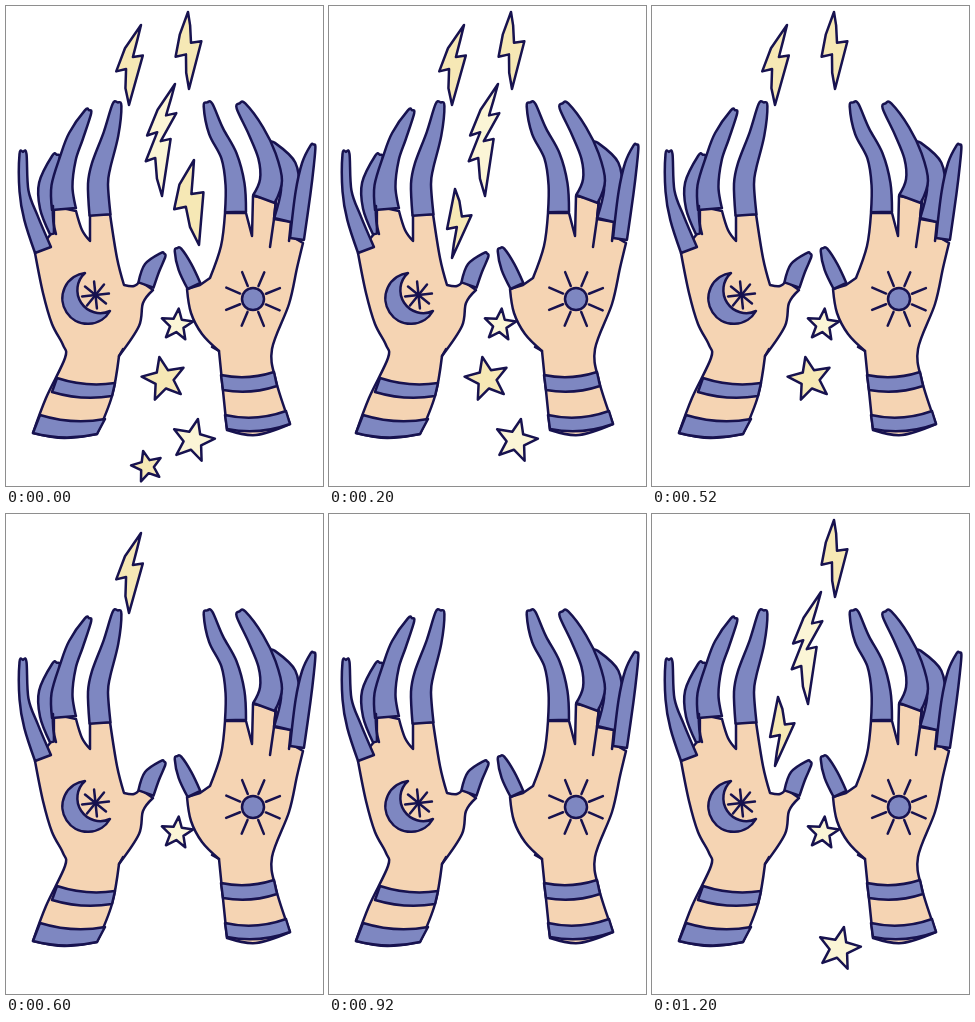
An HTML page that plays this animation: 317x480 px, repeating every 1400 ms.

```html
<!DOCTYPE html>
<html lang="en">
<head>
<meta charset="utf-8">
<title>Magic hands</title>
<style>
  html, body { margin: 0; width: 100%; height: 100%; overflow: hidden; background: #fff; }
  svg { display: block; width: 100%; height: 100%; }
  path, circle { stroke: #17124f; stroke-width: 2.5; stroke-linejoin: round; stroke-linecap: round; }
</style>
</head>
<body>
<svg id="art" viewBox="0 0 317 480"></svg>
<script>
const art = document.getElementById('art');
const SKIN = '#f5d4b3', VIOLET = '#7e87c1', BUTTER = '#f6e8b5', PALE = '#fbf5d6';
const STEP = 200, STEPS = 7;

function path(d, fill = 'none') {
  const el = document.createElementNS('http://www.w3.org/2000/svg', 'path');
  el.setAttribute('d', d);
  el.setAttribute('fill', fill);
  return art.appendChild(el);
}

const polar = (x, y, r, deg) => {
  const a = deg * Math.PI / 180;
  return [x + r * Math.cos(a), y + r * Math.sin(a)];
};

// Closed smooth curve; a third element marks a sharp corner.
function smooth(points) {
  const n = points.length, at = i => points[(i + n) % n];
  const handle = (p, prev, next, dir) =>
    p[2] ? [p[0], p[1]] : [0, 1].map(k => p[k] + dir * (next[k] - prev[k]) / 6);
  let d = `M${points[0][0]},${points[0][1]}`;
  for (let i = 0; i < n; i++) {
    const b = at(i), c = at(i + 1);
    d += `C${handle(b, at(i - 1), c, 1)} ${handle(c, b, at(i + 2), -1)} ${c[0]},${c[1]}`;
  }
  return d + 'Z';
}

// Points are "x,y"; a trailing "!" marks a corner.
const parse = text => text.trim().split(/\s+/).map(w =>
  [...w.replace('!', '').split(',').map(Number), w.endsWith('!')]);

// Joints run from tip to base as [x, y, half width].
function finger(...joints) {
  const left = [], right = [], last = joints.length - 1;
  let cap;
  joints.forEach(([x, y, w], i) => {
    const a = joints[Math.max(0, i - 1)], b = joints[Math.min(last, i + 1)];
    const len = Math.hypot(b[0] - a[0], b[1] - a[1]);
    const dx = w * (b[0] - a[0]) / len, dy = w * (b[1] - a[1]) / len;
    if (i === 0) cap = [x - dx * 0.6, y - dy * 0.6];
    left.push([x + dy, y - dx, i === last]);
    right.unshift([x - dy, y + dx, i === last]);
  });
  path(smooth([cap, ...left, ...right]), VIOLET);
}

// A band across the arm: two sagging edges, top and bottom.
function strap(x0, y0, x1, y1, x2, y2, x3, y3, sag) {
  const dip = (xa, ya, xb, yb) => `Q${(xa + xb) / 2},${(ya + yb) / 2 + sag} ${xb},${yb}`;
  path(`M${x0},${y0}${dip(x0, y0, x1, y1)}L${x2},${y2}${dip(x2, y2, x3, y3)}Z`, VIOLET);
}

function rays(x, y, inner, outer, turn) {
  for (let i = 0; i < 8; i++) {
    path(`M${polar(x, y, inner, turn + i * 45)}L${polar(x, y, outer, turn + i * 45)}`);
  }
}

function star(fill, x, y, r, turn) {
  const pts = Array.from({ length: 10 }, (_, i) => polar(x, y, i % 2 ? r * 0.43 : r, turn - 90 + i * 36));
  return path(`M${pts.join(' ')}Z`, fill);
}

// Zigzag around the line from (x0, y0) to (x1, y1), bowed sideways, with one kink per entry.
function bolt(fill, x0, y0, x1, y1, w, bow, kinks = [0.58]) {
  const first = kinks[0], end = kinks[kinks.length - 1];
  const pts = [[0, 0], [-0.65, first * 0.5]];
  for (const k of kinks) pts.push([-1, k], [-0.2, k - 0.03]);
  pts.push([-0.2, (1 + end) / 2], [0, 1]);
  for (const k of [...kinks].reverse()) pts.push([1, k - 0.2], [0.2, k - 0.18]);
  pts.push([0.15, first * 0.3]);
  const place = ([u, v]) => [x0 + (x1 - x0) * v + u * w + bow * Math.sin(Math.PI * v), y0 + (y1 - y0) * v];
  return path(`M${pts.map(place).join(' ')}Z`, fill);
}

function leftHand() {
  path(smooth(parse(`29,247! 37,287 46,318 57,339 59,352 40,392 27,427! 58,432 91,428! 106,390 113,350!
    133,320 137,297 147,284! 134,275! 128,280 118,279! 111,252 104,208! 84,209! 84,235! 76,224
    70,205! 47,200! 45,228!`)), SKIN);
  finger([50, 151, 4], [41, 178, 8], [41, 202, 7], [46, 228, 2]);
  finger([17, 148, 3.5], [18, 185, 4.5], [25, 212, 7], [37, 244, 8.5]);
  finger([82, 106, 3.5], [70, 130, 7.5], [62, 152, 8], [56, 180, 10.5], [58, 203, 12]);
  finger([111, 99, 4.5], [105, 128, 7.5], [95, 160, 9.5], [92, 178, 10], [94, 209, 10.5]);
  finger([157, 249, 3], [146, 262, 8], [140, 279, 8]);
  path('M47,200Q46,215 50,228M113,350L117,343');
  strap(51, 372, 109, 377, 106, 390, 46, 386, 7);
  strap(34, 409, 99, 413, 91, 428, 27, 427, 8);
  path('M79,267A25.5,25.5 0 1 0 104,305A23,23 0 0 1 79,267Z', VIOLET);
  rays(89.5, 289, 0, 13.5, -6);
}

function rightHand() {
  path(smooth(parse(`219,207! 215,240 204,272! 194,279! 181,283! 185,307 196,328 213,345! 216,375 221,424!
    250,429 284,418! 270,375 266,343 283,298 291,262 297,237! 285,230! 285,216! 268,213! 270,194!
    247,190! 246,230! 240,207!`)), SKIN);
  finger([265, 140, 5], [281, 160, 9], [284, 185, 9], [277, 214, 9]);
  finger([307, 140, 2.5], [302, 158, 6], [297, 187, 7.5], [291, 233, 7]);
  finger([235, 100, 5], [250, 125, 8], [261, 150, 9], [265, 174, 11], [258, 193, 11.5]);
  finger([202, 99, 4.5], [210, 125, 7.5], [223, 150, 8], [229, 178, 9.5], [229.5, 206, 10.5]);
  finger([172, 244, 3.5], [179, 261, 7], [188, 280, 7]);
  path('M270,194L268,213L264,241M285,216L283,235M213,345L206,341');
  strap(215, 369, 268, 366, 271, 380, 217, 384, 7);
  strap(219, 409, 280, 405, 284, 418, 221, 423, 9);
  path('M236,293a11,11 0 1 0 22,0a11,11 0 1 0 -22,0Z', VIOLET);
  rays(247, 293, 14, 29, -22);
}

// One character per step: 1 shows the piece, 0 hides it.
function blink(el, plan) {
  const frames = [...plan + plan[0]].map((on, i) =>
    ({ opacity: +on, offset: i / STEPS, easing: 'step-end' }));
  el.animate(frames, { duration: STEP * STEPS, iterations: Infinity });
}

leftHand();
rightHand();

blink(bolt(BUTTER, 135, 19, 123, 99, 12, -6), '1111010');
blink(bolt(BUTTER, 182, 6, 183, 83, 13, 0), '1110001');
blink(bolt(PALE, 169, 78, 156, 190, 12, -10, [0.46, 0.69]), '1100001');
blink(bolt(BUTTER, 188, 154, 193, 239, 15, -8), '1000010');
blink(bolt(BUTTER, 126, 183, 123, 252, 12, 6), '0100001');
blink(star(PALE, 171, 319, 16.5, 6), '1111001');
blink(star(BUTTER, 158, 373, 22.5, -12), '1110010');
blink(star(PALE, 187, 434.5, 22, 13), '1100001');
blink(star(BUTTER, 141, 460.5, 16, -14), '1000010');
</script>
</body>
</html>
```
